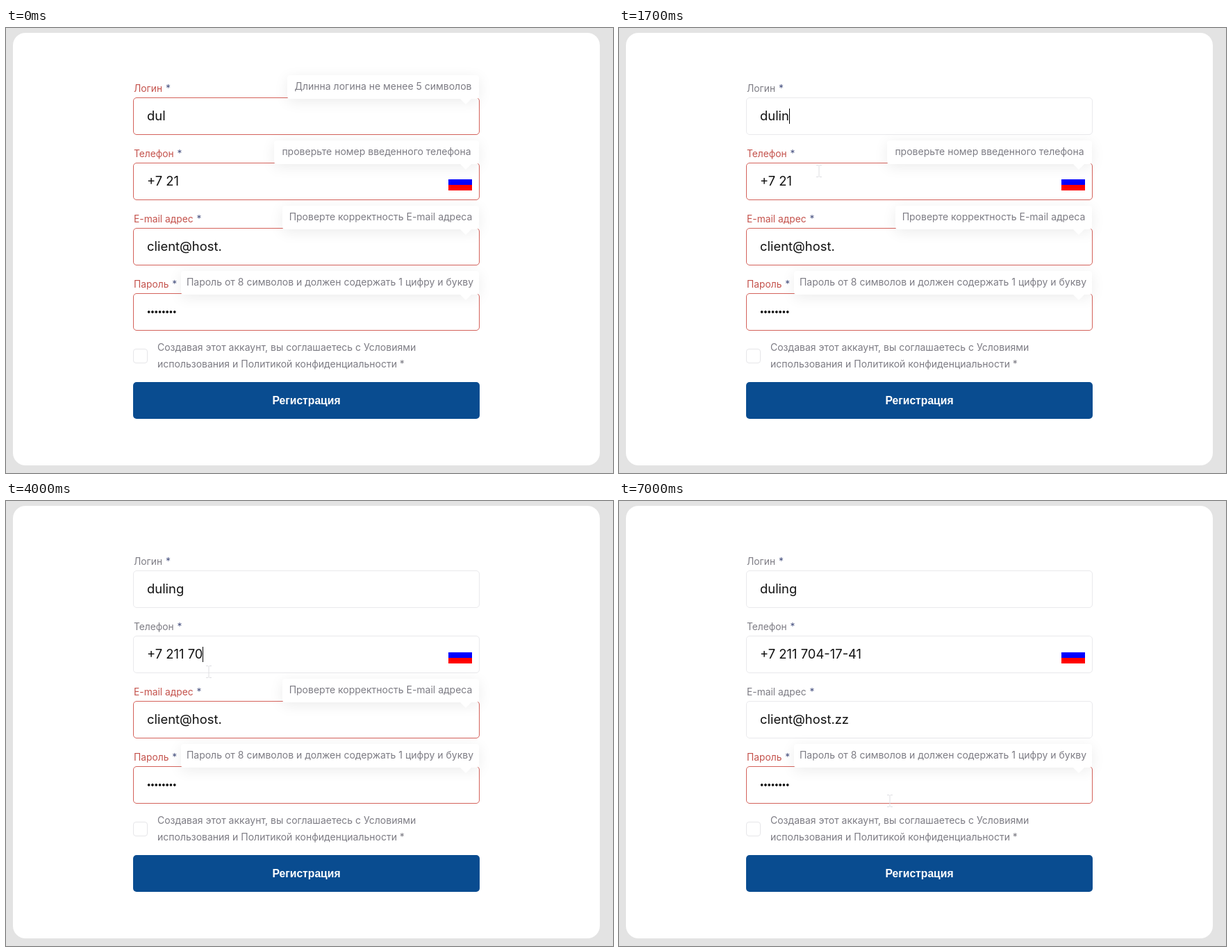
An HTML page that plays this animation: 874 px wide and 641 px high, repeating every 7100 ms.

```html
<!DOCTYPE html>
<html lang="ru">
<head>
<meta charset="utf-8">
<style>
html, body { margin: 0; width: 100%; height: 100%; overflow: hidden; background: #e3e3e3; }
body { position: relative; font: 14px Inter, sans-serif; color: #7d7c84; }
div, span.abs { position: absolute; box-sizing: border-box; white-space: nowrap; }
.card { left: 10px; top: 7px; width: 845px; height: 623px; border-radius: 18px; background: #fff; }
.field { left: 183px; width: 499px; height: 54px; }
.label { left: 1px; top: -25px; line-height: 24px; font-size: 13.8px; }
.label b { font-weight: 400; color: #4b5583; margin-left: 1px; }
.box { inset: 0; border: 1px solid #e9e9ec; border-radius: 5px; padding-left: 19px;
  font-size: 18.4px; line-height: 51px; color: #111; }
.bad .label { color: #c4524c; }
.bad .box { border-color: #d4625b; }
.caret { display: inline-block; width: 1px; height: 22px; background: #000; vertical-align: -5px; }
.tip { right: 1px; top: -32px; height: 34px; line-height: 32px; text-align: center;
  background: #fff; border-radius: 4px; box-shadow: 0 4px 20px rgba(0,0,0,.08); }
.tip::after { content: ""; position: absolute; right: 10px; top: 33px;
  border: solid transparent; border-width: 9px 9px 0; border-top-color: #fff; }
.flag { left: 637px; top: 218px; width: 34px; height: 16px; background: linear-gradient(#00f 50%, #f00 50%); }
.dots { left: 19px; top: 23px; width: 42.4px; height: 6px;
  background: radial-gradient(circle, #111 1.5px, transparent 2.1px) 0 0 / 5.3px 6px; }
.check { left: 183px; top: 462px; width: 21px; height: 21px; border: 1px solid #e6e6e9; border-radius: 4px; }
.terms { left: 218px; top: 448px; line-height: 23.6px; }
.button { left: 183px; top: 510px; width: 499px; height: 53px; border-radius: 5px; background: #094c90;
  color: #fff; font: bold 15.7px/54px "Liberation Sans", Arial, sans-serif; text-align: center; }
#cursor { position: absolute; left: -5px; top: -10px; }
</style>
</head>
<body>
<div class="card"></div>
<div id="form"></div>
<div class="flag"></div>
<div class="check"></div>
<div class="terms">Создавая этот аккаунт, вы соглашаетесь с Условиями<br>использования и Политикой конфиденциальности *</div>
<div class="button">Регистрация</div>
<svg id="cursor" width="10" height="20" fill="none" stroke="#dedee2">
  <path d="M1 1.5h3l1 1 1-1h3M5 2.5v15M1 18.5h3l1-1 1 1h3"/>
</svg>
<script>
const LOOP = 7100, STEP = 100;

// typed: [time, text]; caret: [from, to]; tipOff and okAt: when the error clears
const fields = [
  { label: 'Логин', top: 100, tip: 'Длинна логина не менее 5 символов', tipW: 276,
    typed: [[0, 'dul'], [900, 'duli'], [1400, 'dulin'], [2000, 'duling']],
    caret: [400, 2800], tipOff: 1500, okAt: 1500 },
  { label: 'Телефон', top: 194, tip: 'проверьте номер введенного телефона', tipW: 295,
    typed: [[0, '+7 21'], [3400, '+7 211'], [3700, '+7 211 7'], [3900, '+7 211 70'], [4100, '+7 211 704'],
      [4300, '+7 211 704-1'], [4400, '+7 211 704-17'], [4600, '+7 211 704-17-4'], [4700, '+7 211 704-17-41']],
    caret: [2800, 5300], tipOff: 3400, okAt: 3700 },
  { label: 'E-mail адрес', top: 288, tip: 'Проверте корректность E-mail адреса', tipW: 283,
    typed: [[0, 'client@host.'], [6000, 'client@host.z'], [6200, 'client@host.zz']],
    caret: [5700, 6700], tipOff: 6200, okAt: 6300 },
  { label: 'Пароль', top: 382, tip: 'Пароль от 8 символов и должен содержать 1 цифру и букву', tipW: 429,
    typed: [[0, '']], caret: [LOOP, LOOP], tipOff: LOOP, okAt: LOOP }
];
const path = [[100, 780, 556], [400, 296, 148], [1400, 296, 148], [1700, 288, 206], [2400, 288, 206],
  [2800, 292, 246], [5000, 292, 246], [5300, 360, 330], [6600, 360, 330], [7000, 390, 432]];

const form = document.getElementById('form');
const cursor = document.getElementById('cursor');

for (const f of fields) {
  const el = document.createElement('div');
  el.style.top = f.top + 'px';
  el.className = 'field';
  el.innerHTML = `<div class="box"><span></span><i class="caret"></i></div>
    <div class="label">${f.label} <b>*</b></div>
    <div class="tip" style="width:${f.tipW}px">${f.tip}</div>`;
  form.append(el);
  f.el = el;
  f.text = el.querySelector('span');
  f.caretEl = el.querySelector('.caret');
  f.tipEl = el.querySelector('.tip');
}
fields[3].el.querySelector('.box').insertAdjacentHTML('beforeend', '<div class="dots"></div>');

const show = (el, on) => { el.style.visibility = on ? 'visible' : 'hidden'; };

function pointAt(t) {
  const i = path.findIndex(p => p[0] > t);
  if (i < 0) return path[path.length - 1].slice(1);
  const [t0, x0, y0] = path[i - 1], [t1, x1, y1] = path[i];
  const k = (t - t0) / (t1 - t0);
  return [x0 + (x1 - x0) * k, y0 + (y1 - y0) * k];
}

function draw(now) {
  const t = Math.floor(now % LOOP / STEP) * STEP;
  for (const f of fields) {
    f.text.textContent = f.typed.filter(s => s[0] <= t).pop()[1];
    show(f.caretEl, t >= f.caret[0] && t < f.caret[1]);
    show(f.tipEl, t < f.tipOff);
    f.el.classList.toggle('bad', t < f.okAt);
  }
  const moving = t >= path[0][0];
  show(cursor, moving);
  if (moving) {
    const [x, y] = pointAt(t);
    cursor.style.transform = `translate(${Math.round(x)}px, ${Math.round(y)}px)`;
  }
  requestAnimationFrame(draw);
}
draw(performance.now());
</script>
</body>
</html>
```
